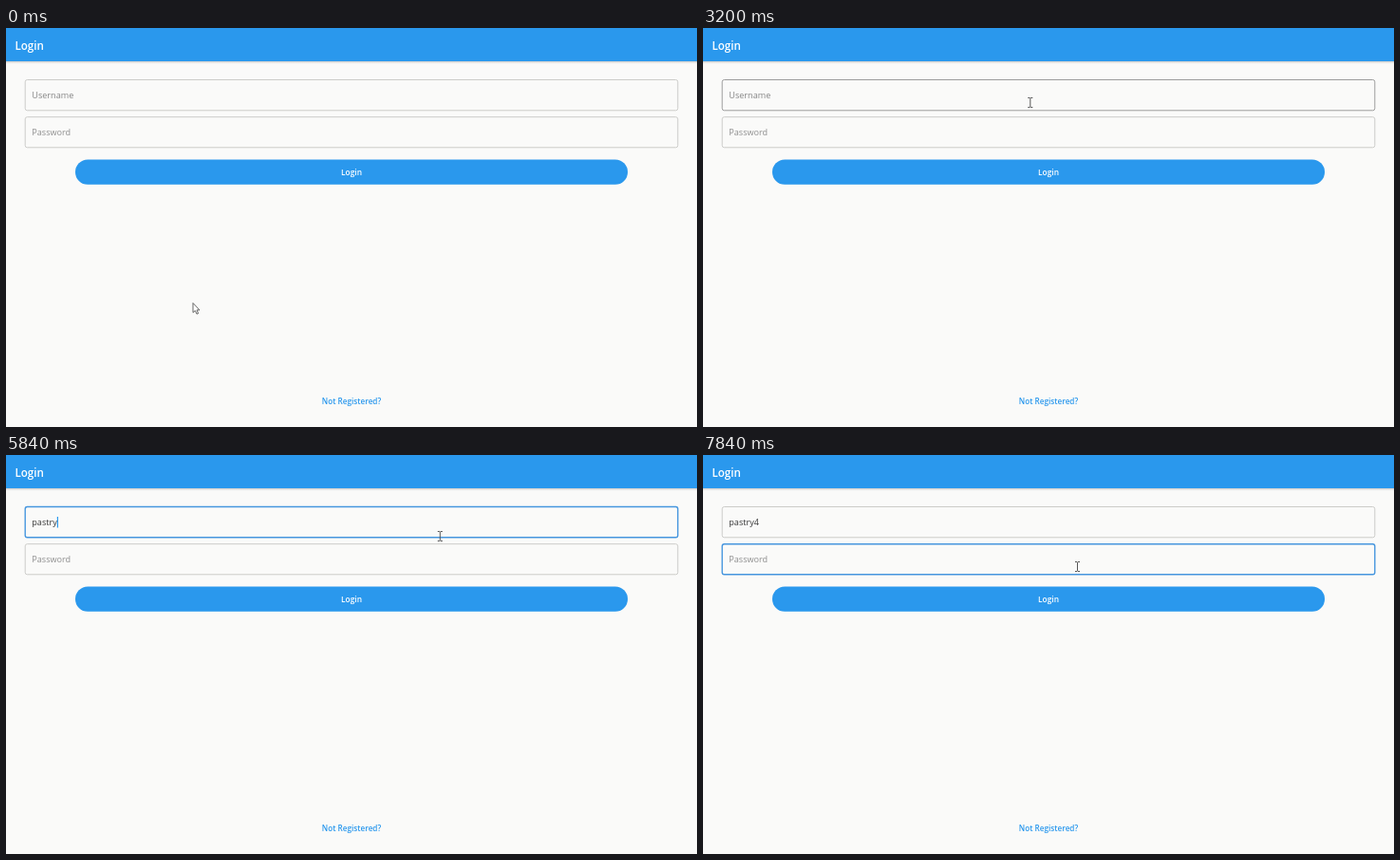
Animation, 728 px wide and 420 px high, one loop 8000 ms. Source, as an HTML page:

```html
<!DOCTYPE html>
<html lang="en">
<head>
<meta charset="utf-8">
<title>Login form</title>
<style>
  html, body { margin: 0; width: 100%; height: 100%; overflow: hidden; background: #fafaf9; }
  svg { display: block; width: 100%; height: 100%; font-family: "Open Sans", "Noto Sans", sans-serif; }
  .field { fill: none; }
  .entry { font-size: 9.1px; }
  .strong { font-weight: 600; }
  .accent { fill: #2a98ed; }
</style>
</head>
<body>
<svg viewBox="0 0 728 420">
  <defs>
    <linearGradient id="shade" x2="0" y2="1">
      <stop offset="0" stop-color="#777" stop-opacity=".4"/>
      <stop offset="1" stop-color="#ccc" stop-opacity="0"/>
    </linearGradient>
  </defs>
  <rect width="728" height="420" fill="#fafaf9"/>
  <rect y="35" width="728" height="3" fill="url(#shade)"/>
  <rect class="accent" width="728" height="35"/>
  <text class="strong" x="9.5" y="22.5" font-size="11.6" fill="#fff">Login</text>

  <rect id="userBox" class="field" x="20.2" y="54.5" width="687.6" height="32.3" rx="2.2"/>
  <rect id="passBox" class="field" x="20.2" y="93.7" width="687.6" height="32.1" rx="2.2"/>
  <text id="userText" class="entry" x="27.3" y="74"></text>
  <text class="entry" x="27.3" y="113" fill="#8f8f8f">Password</text>
  <rect id="caret" class="accent" width="1.2" height="11.5"/>

  <rect class="accent" x="73" y="138.5" width="582" height="26.3" rx="13.15"/>
  <text class="strong" x="364" y="155" font-size="8.4" text-anchor="middle" fill="#fff">Login</text>
  <text class="strong accent" x="364" y="396" font-size="8.2" text-anchor="middle">Not Registered?</text>

  <path id="arrow" d="M0 0V10L2.3 8L4 11.6L5.6 10.9L4 7.4H7Z" fill="#fff" stroke="#555" stroke-width=".9" stroke-linejoin="round"/>
  <path id="beam" d="M-2.5 -5H-.6L0 -4.4L.6 -5H2.5M0 -4.4V4.4M-2.5 5H-.6L0 4.4L.6 5H2.5" fill="none" stroke="#555"/>
</svg>
<script>
const LOOP = 8000;
const NAME = "pastry4";
const TYPE_START = 4670, KEY_GAP = 165, LAST_KEY = 6170;
const USER_FOCUS = 3950, USER_BLUR = 7150, PASS_FOCUS = 7340;
const HOVER_START = 3000;
const IDLE = [200, 200, 197], HOVER = [128, 128, 128], FOCUS = [70, 150, 222];

const START = { x: 197, y: 289.5 };
const MOVES = [
  { from: 930, to: 1170, x: 226, y: 226 },
  { from: 1440, to: 1630, x: 308, y: 98 },
  { from: 1830, to: 2020, x: 316, y: 128 },
  { from: 2020, to: 2400, x: 305, y: 76 },
  { from: HOVER_START, to: 3600, x: 457.3, y: 85.5 },
  { from: 6400, to: 7040, x: 394.5, y: 117.5 }
];

const [userBox, passBox, userText, caret, arrow, beam] =
  ["userBox", "passBox", "userText", "caret", "arrow", "beam"]
    .map(id => document.getElementById(id));

const lerp = (a, b, p) => a + (b - a) * p;
const mix = (a, b, p) => a.map((v, i) => lerp(v, b[i], p));
const show = (el, on) => el.setAttribute("visibility", on ? "visible" : "hidden");

function ease(t, from, to) {
  const p = Math.min(1, Math.max(0, (t - from) / (to - from)));
  return p * p * (3 - 2 * p);
}

const fade = (t, from) => ease(t, from, from + 300);

function pointerAt(t) {
  return MOVES.reduce((pos, move) => {
    const p = ease(t, move.from, move.to);
    return { x: lerp(pos.x, move.x, p), y: lerp(pos.y, move.y, p) };
  }, START);
}

// The last character follows after a pause.
const keyTime = i => i < NAME.length - 1 ? TYPE_START + i * KEY_GAP : LAST_KEY;

function paintBorder(el, color, focus) {
  el.setAttribute("stroke", `rgb(${color.map(Math.round)})`);
  el.setAttribute("stroke-width", lerp(0.9, 1.4, focus));
}

function drawFields(t) {
  const focus = fade(t, USER_FOCUS), blur = fade(t, USER_BLUR);
  const active = mix(mix(IDLE, HOVER, fade(t, HOVER_START)), FOCUS, focus);
  paintBorder(userBox, mix(active, IDLE, blur), focus * (1 - blur));

  const passFocus = fade(t, USER_BLUR + 50);
  paintBorder(passBox, mix(IDLE, FOCUS, passFocus), passFocus);
}

function drawTyping(t) {
  const keys = [...NAME].map((_, i) => keyTime(i)).filter(time => time <= t);
  const typed = NAME.slice(0, keys.length);
  userText.textContent = typed || "Username";
  userText.setAttribute("fill", typed ? "#3a3a3a" : "#858585");

  const inPass = t >= PASS_FOCUS;
  const inUser = t >= USER_FOCUS && t < USER_BLUR;
  const lastInput = inPass ? PASS_FOCUS : Math.max(USER_FOCUS, ...keys);
  show(caret, (inUser || inPass) && (t - lastInput) % 1000 < 500);
  caret.setAttribute("x", 27.3 + (inUser && typed ? userText.getComputedTextLength() : 0));
  caret.setAttribute("y", inPass ? 104 : 65);
}

function drawPointer(t) {
  const { x, y } = pointerAt(t);
  const overField = t > HOVER_START;
  show(arrow, !overField);
  show(beam, overField);
  (overField ? beam : arrow).setAttribute("transform", `translate(${x} ${y})`);
}

function render(t) {
  drawFields(t);
  drawTyping(t);
  drawPointer(t);
}

function tick() {
  render(performance.now() % LOOP);
  requestAnimationFrame(tick);
}
tick();
</script>
</body>
</html>
```
